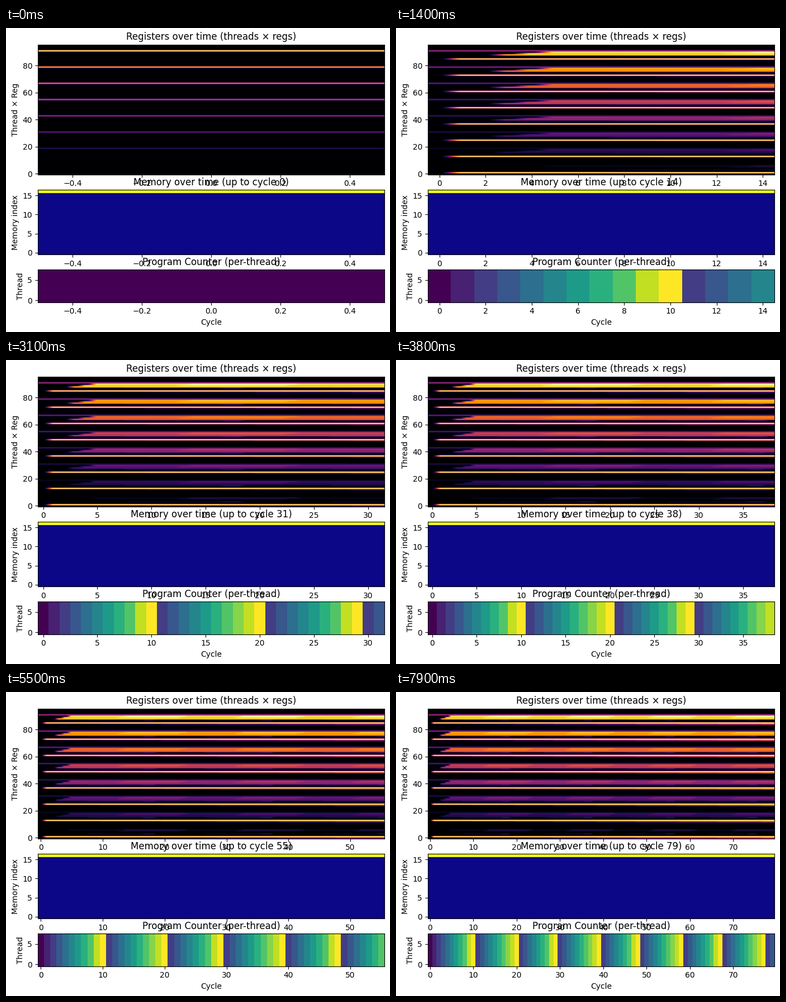
A matplotlib script for the animation above (8 s loop, 687 by 545 pixels).

```python
import numpy as np
import matplotlib.pyplot as plt
from matplotlib.animation import FuncAnimation

DPI = 100
W, H = 687, 545
THREADS, REGS, MEM, CYCLES = 8, 12, 17, 80
STEPS = 16


def simulate():
    """Run an odd-even sort kernel in lockstep and log its state every cycle."""
    tid = np.arange(THREADS)
    r = np.zeros((THREADS, REGS), int)
    r[:, 7] = tid
    pc = 0
    regs, pcs = [], []
    for _ in range(CYCLES):
        regs.append(r.ravel().copy())
        pcs.append(np.full(THREADS, pc))
        step = pc + 1
        if pc == 0:
            r[:, 1] = STEPS
        elif pc == 1:
            r[:, 0] = 0
        elif pc == 2:
            r[:, 4] = 2 * tid
        elif pc == 3:
            r[:, 5] = r[:, 4] + r[:, 3]
        elif pc == 4:
            r[:, 6] = r[:, 5] + 1
        elif pc == 7:
            r[:, 3] += 1
        elif pc == 8 and r[0, 3] < 2:
            step = 10
        elif pc == 9:
            r[:, 3] = 0
        elif pc == 10:
            r[:, 0] += 1
        elif pc == 11:
            step = 2
        pc = step
    return np.array(regs).T, np.array(pcs).T


regs, pcs = simulate()
mem = np.zeros((MEM, CYCLES))
mem[-1] = 1

fig, axes = plt.subplots(3, 1, figsize=(W / DPI, H / DPI), dpi=DPI,
                         gridspec_kw={"height_ratios": [4, 2, 1]})
panels = []
for ax, data, cmap, label in zip(
        axes, (regs, mem, pcs), ("inferno", "plasma", "viridis"),
        ("Thread × Reg", "Memory index", "Thread")):
    im = ax.imshow(data[:, :1], aspect="auto", origin="lower", cmap=cmap)
    ax.set_ylabel(label)
    panels.append((ax, im, data))
axes[0].set_title("Registers over time (threads × regs)")
axes[2].set_title("Program Counter (per-thread)")
axes[2].set_xlabel("Cycle")


def place(x, y):
    """Put the lower left corner of the 620 x 462 px plot area at (x, y)."""
    fig.subplots_adjust(left=x / W, right=(x + 620) / W,
                        bottom=y / H, top=(y + 462) / H, hspace=0.2)


def update(cycle):
    for ax, im, data in panels:
        part = data[:, :cycle + 1]
        im.set_data(part)
        im.set_extent((-0.5, cycle + 0.5, -0.5, len(data) - 0.5))
        im.set_clim(part.min(), part.max())
        ax.set_xlim(-0.5, cycle + 0.5)
    axes[1].set_title(f"Memory over time (up to cycle {cycle})")
    return [im for _, im, _ in panels]


# Leave a 10 px margin to the left of and below the labels.
update(0)
place(57, 53)
fig.draw_without_rendering()
box = fig.get_tightbbox()
place(67 - box.x0 * DPI, 63 - box.y0 * DPI)

anim = FuncAnimation(fig, update, frames=CYCLES, init_func=lambda: update(0),
                     interval=100, repeat=True, repeat_delay=0, blit=False)
plt.show()
```
